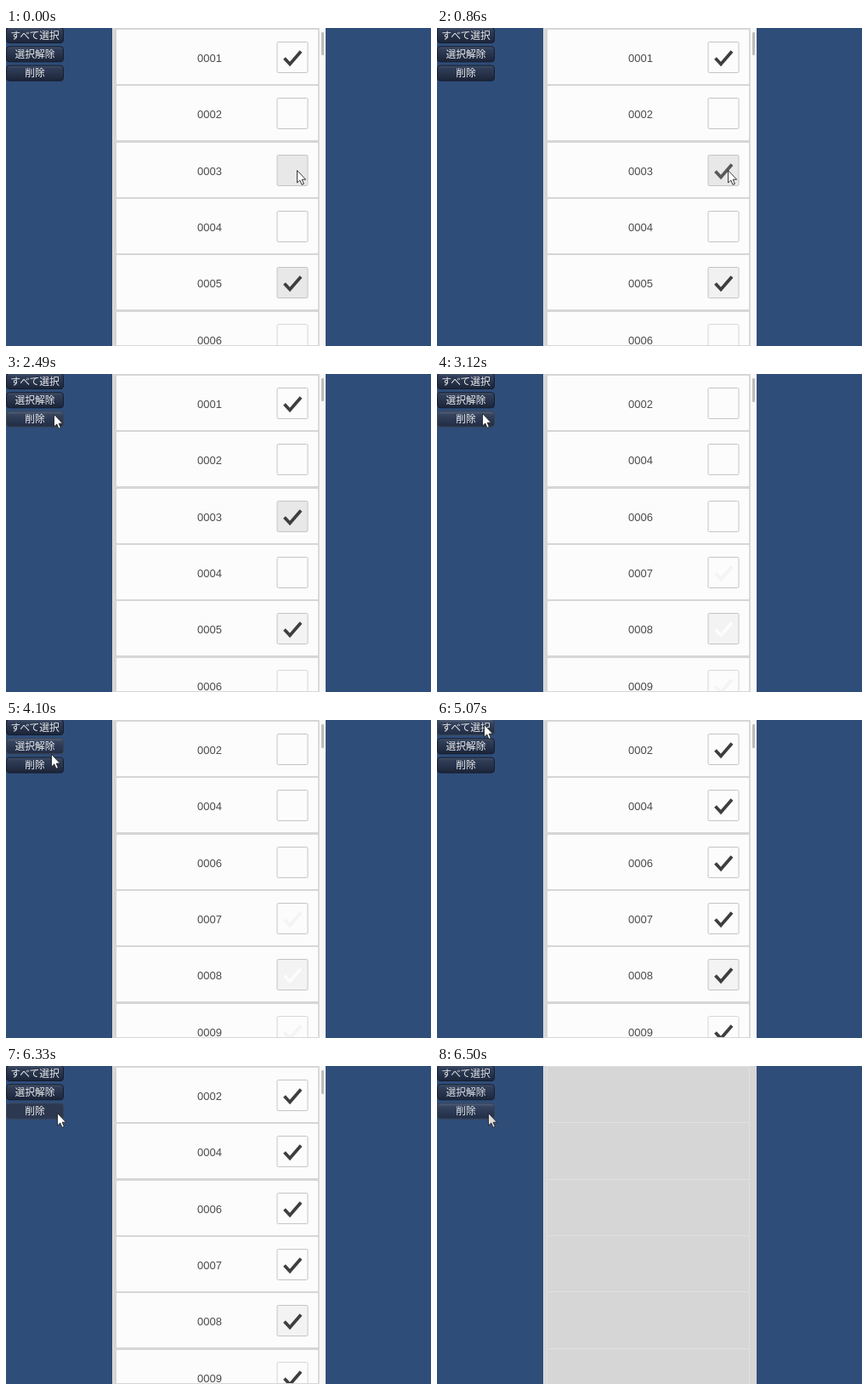
An HTML page for the animation above (7.47 s loop, 500 by 374 pixels).

```html
<!DOCTYPE html>
<html lang="ja">
<head>
<meta charset="utf-8">
<style>
html, body { margin: 0; width: 100%; height: 100%; overflow: hidden; background: #2f4d79; }
svg { display: block; }
text { text-anchor: middle; }
.num { font: 13px "Liberation Sans", Arial, sans-serif; fill: #4c4c4c; }
.btn text { font: 11.8px "Noto Sans CJK JP", "Noto Sans CJK", sans-serif; fill: #ececec; }
.btn rect { fill: url(#face); stroke: #141c2c; }
.btn.hover rect { fill: url(#lit); stroke: #39424f; }
.btn.down rect { fill: #2c3850; }
</style>
</head>
<body>
<svg id="stage" width="500" height="374" viewBox="0 0 500 374">
  <defs>
    <linearGradient id="face" x2="0" y2="1">
      <stop stop-color="#46536b"/><stop offset=".2" stop-color="#303d57"/>
      <stop offset=".55" stop-color="#27334b"/><stop offset="1" stop-color="#1b2438"/>
    </linearGradient>
    <linearGradient id="lit" x2="0" y2="1">
      <stop stop-color="#5a667c"/><stop offset=".2" stop-color="#36445f"/>
      <stop offset=".55" stop-color="#2b3852"/><stop offset="1" stop-color="#222d44"/>
    </linearGradient>
  </defs>
  <rect width="500" height="374" fill="#2f4d79"/>
  <rect x="125" width="251" height="374" fill="#d6d6d6"/>
  <rect x="125" width="1" height="374" fill="#e4e4e4"/>
  <g id="lines" stroke="#e0e0e0"><path d="M367.5 0V374M129.5 0V374"/></g>
  <g id="list">
    <rect x="368" width="8" height="374" fill="#f8f8f8"/>
    <rect x="368" width="1" height="374" fill="#dedede"/>
    <rect id="thumb" x="371" y="5" width="3" rx="1" fill="#bcbcbc"/>
  </g>
  <g id="buttons"></g>
  <path id="cursor" d="M.5 .5V15L3.8 12 6 17.3 8.4 16.3 6.2 11.2H10.6Z" stroke="#222" stroke-width=".9"/>
</svg>
<script>
const LOOP = 7470, PITCH = 66.3, DELETE = 2950, CLEAR = 6500;
const $ = id => document.getElementById(id);

function add(parent, tag, attrs, text = '') {
  const el = document.createElementNS('http://www.w3.org/2000/svg', tag);
  for (const k in attrs) el.setAttribute(k, attrs[k]);
  el.textContent = text;
  return parent.appendChild(el);
}

const rows = [...Array(6).keys()].map(i => {
  const y = Math.round(2 + i * PITCH);
  add($('lines'), 'path', { d: `M129 ${y - 1.5}H368` });
  const g = add($('list'), 'g', { transform: `translate(0 ${y})` });
  return {
    y,
    card: add(g, 'rect', { x: 130, width: 237, height: 64, rx: 1 }),
    num: add(g, 'text', { x: 239.5, y: 37.5, class: 'num' }),
    box: add(g, 'rect', { x: 319, y: 14.5, width: 36, height: 36, rx: 1.5,
      stroke: i == 5 ? '#d6d6d6' : '#c4c4c4' }),
    check: add(g, 'path', { d: 'M327.5 33.5L334 40.5 347 25.5', fill: 'none', 'stroke-width': 3.8 })
  };
});
add($('list'), 'path', { d: 'M129 373.5H368', stroke: '#d6d6d6' });

const buttons = ['すべて選択', '選択解除', '削除'].map((label, i) => {
  const y = i * 22.3 - .5;
  const g = add($('buttons'), 'g', { class: 'btn' });
  add(g, 'rect', { x: .5, y, width: 67, height: 18, rx: 3.5 });
  add(g, 'text', { x: 34, y: y + 13.3 }, label);
  return { g, y };
});

// Pointer path: time, x, y
const path = [
  [0, 342, 167], [1270, 342, 167], [1650, 218, 107], [2050, 94, 61],
  [2065, 94, 61], [2170, 74, 54], [2320, 74, 54], [2490, 56, 47],
  [2769, 56, 47], [2770, 53, 46], [4060, 53, 46], [4100, 53, 40],
  [4350, 54, 13], [4450, 54, 13], [4670, 55, 5], [5400, 55, 5],
  [5990, 60, 55], [LOOP, 60, 55]
];

const ramp = (t, a, b) => Math.min(1, Math.max(0, (t - a) / (b - a)));
const mix = (a, b, k) => a + (b - a) * k;
const grey = v => `rgb(${Array(3).fill(Math.round(v))})`;

function pointer(t) {
  const i = path.findIndex(p => p[0] > t);
  const a = path[i - 1], b = path[i], k = ramp(t, a[0], b[0]);
  return [mix(a[1], b[1], k), mix(a[2], b[2], k)];
}

function boxLevel(i, t) {
  if (i == 4) return mix(232, 243, ramp(t, 650, 900));
  return i == 2 && t < DELETE ? 232 : 252;
}

// Tick shade; equal to the box shade when unticked
function checkLevel(i, t) {
  const dark = 62, empty = boxLevel(i, t);
  if (t < DELETE) {
    if (i == 2) return mix(empty, dark, ramp(t, 650, 900));
    return i == 0 || i == 4 ? dark : empty;
  }
  const ghost = i < 3 ? empty : i == 4 ? 252 : 244;
  const faded = i < 3 ? ghost : mix(dark, ghost, ramp(t, 2910, 3120));
  return mix(faded, dark, ramp(t, 4860, 5070));
}

function draw(t) {
  const [x, y] = pointer(t), late = t >= DELETE, empty = t >= CLEAR;
  $('list').style.display = empty ? 'none' : '';
  $('lines').style.display = empty ? '' : 'none';
  $('thumb').setAttribute('height', late ? 28 : 27);
  $('cursor').setAttribute('transform', `translate(${x} ${y})`);
  $('cursor').setAttribute('fill', empty ? '#dedede' : '#fff');
  $('buttons').style.opacity = empty ? .94 : 1;

  rows.forEach((r, i) => {
    const over = x > 130 && x < 319 && y >= r.y && y < r.y + 64;
    const id = late ? (i < 3 ? 2 * i + 2 : i + 4) : i + 1;
    r.num.textContent = String(id).padStart(4, '0');
    r.card.setAttribute('fill', grey(over ? 244 : 252));
    r.box.setAttribute('fill', grey(boxLevel(i, t)));
    r.check.setAttribute('stroke', grey(checkLevel(i, t)));
  });

  const pressed = [t >= 4900 && t < 5030, false, t >= 2950 && t < 3080 || t >= 6330 && t < CLEAR];
  buttons.forEach((b, i) => {
    b.g.classList.toggle('hover', x < 68 && y >= b.y && y <= b.y + 18.5);
    b.g.classList.toggle('down', pressed[i]);
  });
}

const start = performance.now();
function tick() {
  draw((performance.now() - start) % LOOP);
  requestAnimationFrame(tick);
}
tick();
</script>
</body>
</html>
```
